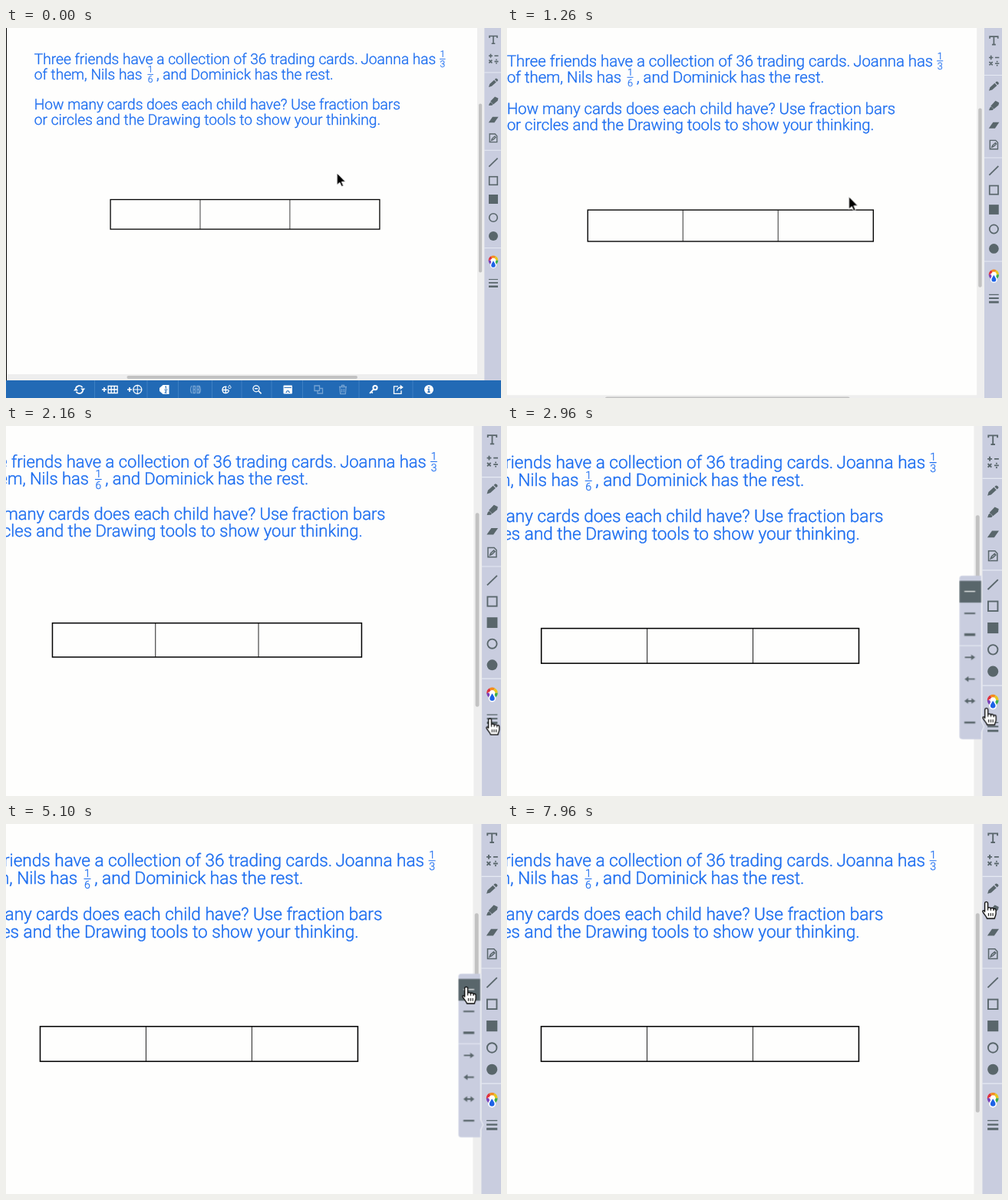
An HTML page for the animation above (8000 ms loop, 645 by 482 pixels).

```html
<!DOCTYPE html>
<html lang="en">
<head>
<meta charset="utf-8">
<title>Fraction bars</title>
<style>
html, body { margin: 0; width: 100%; height: 100%; overflow: hidden; background: #fefefd; }
svg { display: block; width: 645px; height: 482px; }
text { font-family: Roboto, sans-serif; text-rendering: geometricPrecision; }

#scene, #cursor, .step { animation: 8s infinite; }
#scene { transform-origin: 645px 0; animation-name: zoom; }
#cursor { animation-name: move; animation-timing-function: cubic-bezier(.37, 0, .63, 1); }
.step { animation-timing-function: step-end; }
#popup { animation-name: popup; }
#second { animation-name: second; }
#arrow { animation-name: arrow; }
#hand { animation-name: hand; }

/* quadratic ease in, then out */
@keyframes zoom {
  0%, .0625% { transform: scale(1); animation-timing-function: cubic-bezier(.3333, 0, .6667, .3333); }
  19.1875% { transform: scale(1.09); animation-timing-function: cubic-bezier(.3333, .6667, .6667, 1); }
  38.3125%, 100% { transform: scale(1.18); }
}
@keyframes move {
  0%, 12.65% { transform: translate(431.3px, 189px); }
  26%, 34.125% { transform: translate(632.8px, 331.6px); }
  45%, 52.125% { transform: translate(604px, 208px); }
  58.75%, 77.125% { transform: translate(606.9px, 179.7px); }
  81.25%, 95% { transform: translate(557px, 185px); }
  99.5%, 100% { transform: translate(628px, 85.8px); }
}
@keyframes popup { 0%, 83.75%, 100% { opacity: 0; } 31.25% { opacity: 1; } }
@keyframes second { 0%, 63.25%, 100% { opacity: 0; } 50.375% { opacity: 1; } }
@keyframes arrow { 0%, 78.28% { opacity: 1; } 24%, 98.65%, 100% { opacity: 0; } }
@keyframes hand { 0%, 78.28% { opacity: 0; } 24%, 98.65%, 100% { opacity: 1; } }

#problem { fill: #1a6cf0; stroke: #1a6cf0; stroke-width: .35; font-size: 19px; font-weight: 300; }
.small { font-size: 12px; text-anchor: middle; stroke-width: .2; }
.line { fill: none; stroke: currentColor; }
.solid { fill: currentColor; }
#side, #popup { color: #59666b; stroke-width: 1.6; }
#bottom { color: #fff; stroke-width: 1.3; }
.dim { color: #75a3d3; }
.sep { fill: none; stroke: #e6eaf4; stroke-width: 1; }
</style>
</head>
<body>
<svg viewBox="0 0 645 482">
<g id="scene">
  <rect width="645" height="482" fill="#fefefd"/>
  <path d="M.5 0V459" stroke="#000"/>

  <g id="problem">
    <text x="36.8" y="46.7">Three friends have a collection of 36 trading cards.</text>
    <text x="560.3" y="46.7" text-anchor="end">Joanna has</text>
    <text x="36.8" y="66.5">of them, Nils has</text>
    <text x="196" y="66.5">, and Dominick has the rest.</text>
    <text x="36.8" y="106">How many cards does each child have? Use fraction bars</text>
    <text id="last" x="36.8" y="125.8">or circles and the Drawing tools to show your thinking.</text>
    <text class="small" x="568.8" y="38.2">1</text>
    <text class="small" x="568.8" y="51.2">3</text>
    <text class="small" x="188.2" y="58.2">1</text>
    <text class="small" x="188.2" y="71.2">6</text>
    <path d="M565 40.4h7.6M184.4 60.6h7.6" stroke-width=".9"/>
  </g>

  <rect x="136.1" y="223.5" width="350.8" height="38.6" fill="none" stroke="#000" stroke-width="1.3"/>
  <path d="M253 223.5v38.6M369.9 223.5v38.6" stroke="#111" stroke-width=".8"/>

  <!-- scroll bars -->
  <path d="M614 0h9.5v459H1v-8h613z" fill="#eee"/>
  <rect x="616" y="98.5" width="4.2" height="220" rx="2" fill="#c2c2c2"/>
  <rect x="157.5" y="453" width="300.5" height="4" rx="2" fill="#c2c2c2"/>

  <g id="side">
    <rect x="623.3" width="21.7" height="459" fill="#c9cddf"/>
    <path class="sep" d="M623.3 58H645M623.3 159.3H645M623.3 286.6H645"/>
    <path class="line" d="M630 13V10.5h10V13M635 10.5v10M632.7 20.3h4.6"/>
    <path class="line" d="M629 36.3h5M631.5 33.8v5M636.5 36.3h5M629.4 41.6l4 4M633.4 41.6l-4 4M636.5 43.6h5"/>
    <circle class="solid" cx="639" cy="41.3" r=".9"/>
    <circle class="solid" cx="639" cy="45.9" r=".9"/>
    <path class="solid" d="M629 77l1.2-4 5.8-5.3 2.8 2.9-5.8 5.2zM636.8 67l1.7-1.4q2.6.5 2.7 2.7l-1.6 1.6z"/>
    <path class="solid" d="M629 101l1-3 1.6-1.5 3 3-1.2 1.3zM631.2 95.6l5.8-6.2 4.4 2.2-.7 3.2-5.6 4.6z"/>
    <path class="solid" d="M628.8 123.2l5.2-7.4h7.6l-5.2 7.4z"/>
    <path class="line" stroke-width="1.3" d="M630.2 138h7l2.6 2.7v8h-9.6zM632.5 146.5l1-2.4 3.4-3 1.2 1.3-3.3 3z"/>
    <path class="line" d="M629.3 180.6L640.6 169.6"/>
    <rect class="line" x="629.7" y="193.7" width="10.6" height="10.6"/>
    <rect class="solid" x="629" y="217" width="12" height="12"/>
    <circle class="line" cx="635" cy="247" r="5.3"/>
    <circle class="solid" cx="635" cy="271" r="6"/>
    <circle cx="635" cy="302.8" r="4.5" fill="#fff"/>
    <g id="wheel" fill="none" stroke-width="2.9"></g>
    <path d="M635 302c1.6 2.900 3.500 4.700 3.500 6.900a3.500 3.500 0 0 1-7 0c0-2.200 1.900-4 3.500-6.900z" fill="#1d62e6" stroke="#fff" stroke-width="1.4"/>
    <path class="solid" d="M629 327h12v1h-12zM629 331h12v1.800h-12zM629 335.400h12v2.500h-12z"/>
  </g>

  <g id="bottom">
    <rect y="459" width="645" height="23" fill="#226ab5"/>
    <path d="M115.5 459v23M184 459v23M224.5 459v23M268.5 459v23M307 459v23M346 459v23M386.5 459v23M460 459v23M530 459v23" stroke="#3c7fc3" stroke-width="1"/>
    <path class="line" stroke-width="1.7" d="M90.9 469.5a4.8 4.8 0 0 1 8.7-1.2M100.2 472.5a4.8 4.8 0 0 1-8.7 1.3"/>
    <path class="solid" d="M97.2 469.6h6l-3 3.6zM88 472.4h6l-3-3.6z"/>
    <path class="line" stroke-width="1.6" d="M125 471h6M128 468v6M158 471h6M161 468v6"/>
    <path class="line" d="M133.2 466.5h12v9h-12zM137.2 466.5v9M141.2 466.5v9M133.2 471h12"/>
    <circle class="line" cx="171.3" cy="471" r="5.5"/>
    <path class="line" d="M171.3 465.5v11M165.8 471h11" stroke-width="1"/>
    <path class="solid" d="M204.5 465h8v12h-8l-4.500-4v-4z"/>
    <path d="M207.2 467.4l1.2-.7v3M206.5 471h4M206.9 472.8h2.4l-2.4 2.5h2.8" fill="none" stroke="#226ab5" stroke-width="1"/>
    <g class="dim">
      <path class="line" d="M242 466q-3 5 0 10M252 466q3 5 0 10M244 466.5h2.5v9H244zM249 466.5h2.5v9H249zM244 471h2.5M249 471h2.5"/>
      <path class="line" d="M402 466h6.5v6.5H402zM406 472.5v3.5h6.5v-6.5h-4"/>
      <path class="line" d="M434 467.5h10M437.5 467v-1.6h3v1.6M435 468l.7 8.6h6.6l.7-8.6M437.6 470v4.8M440.4 470v4.8"/>
    </g>
    <path class="line" d="M287.5 467.3a4.3 4.3 0 1 0 3 4.4M282 471.5h8M286.3 467v9"/>
    <path class="line" d="M291.4 465.2c2.4 3 2 4.4 0 4.4s-2.4-1.4 0-4.4z" stroke-width="1"/>
    <circle class="line" cx="326" cy="469.8" r="4"/>
    <path class="line" d="M324 469.8h4M329 472.8l3.6 3.6" stroke-width="1.6"/>
    <rect class="solid" x="361.5" y="465.5" width="11.5" height="11" rx="1"/>
    <path d="M362.5 468.4h9.5M364.5 474.5h1.4v-1.7h2.7v1.7h1.4" fill="none" stroke="#226ab5" stroke-width="1"/>
    <circle class="line" cx="481" cy="468.6" r="2.6" stroke-width="2"/>
    <path class="line" stroke-width="1.8" d="M479 470.6l-5 5.2M476 473.8l1.8 1.8"/>
    <path class="line" d="M511 466.8h-5.5v9.5h9.5v-4M509.5 472.8q.5-4.5 5-4.8"/>
    <path class="solid" d="M513.6 464.8l4.2 3.2-4.2 3.2z"/>
    <circle class="solid" cx="551" cy="471" r="6"/>
    <path d="M551 467v1.8M549.5 470.5h1.5v3.6M549.3 474.2h3.4" fill="none" stroke="#226ab5" stroke-width="1.4"/>
  </g>

  <g id="popup" class="step">
    <path d="M622.5 165.3v161l2.8 5.7-2.8 5.7v8.1H601a3 3 0 0 1-3-3V168.3a3 3 0 0 1 3-3z" fill="#c9cddf"/>
    <path d="M622.4 165.3v161l2.8 5.7-2.8 5.7v8.1" fill="none" stroke="#eceff6" stroke-width=".9"/>
    <path class="sep" d="M598 242.6h24.4"/>
    <rect class="solid" x="598" y="171" width="24" height="24"/>
    <path d="M603.4 182.7h12" stroke="#fff" stroke-width="1"/>
    <path class="solid" d="M603.4 206h12v1.7h-12zM603.4 229h12v2.9h-12zM603.4 326.5h12v2h-12z"/>
    <path class="line" d="M604 255.5h8M607 279.5h8M606 303.7h7"/>
    <path class="solid" d="M611 252.4l4.3 3.1-4.3 3.1zM608 276.4l-4.3 3.1 4.3 3.1zM611.3 300.6l4.2 3.1-4.2 3.1zM607.6 300.6l-4.2 3.1 4.2 3.1z"/>
    <g id="second" class="step">
      <rect x="598" y="170.5" width="24" height="25" fill="#c9cddf"/>
      <path class="solid" d="M603.4 182.2h12v1h-12zM598 195h24v24h-24z"/>
      <path d="M603.4 206.9h12" stroke="#fff" stroke-width="1.7"/>
    </g>
  </g>

  <g id="cursor">
    <path id="arrow" class="step" d="M0 0V15.5L3.6 12.2 6 17.6 8.4 16.5 6.1 11.3H11z" fill="#000" stroke="#fff" stroke-width=".9"/>
    <g id="hand" class="step" stroke="#000" stroke-width="1.1" stroke-linejoin="round">
      <path d="M-2 11V1.8a1.7 1.7 0 0 1 3.4 0V7.2c.4-1.3 3-1.2 3.2.4.6-1.2 3-.9 3.1.7.7-1 2.6-.6 2.6 1V13c0 2-1.2 3-1.5 5.5H.5c-.4-2-3.2-4.6-4.6-7.2-.8-1.6.9-2.6 2.1-.3z" fill="#fff"/>
      <path d="M1.4 7v2.6M4.6 7.500v2.200M7.700 8.200v1.800M2.100 12.500v3.300M4.500 12.500v3.300M6.900 12.500v3.300" stroke-width=".9"/>
    </g>
  </g>
</g>
</svg>
<script>
// colour wheel: six equal arcs, clockwise from the left
const hues = ['#e0303c', '#f58a1f', '#e8c81f', '#3fae49', '#2a6fdb', '#7a3fb8'];
document.getElementById('wheel').innerHTML = hues.map((c, i) =>
  `<circle cx="635" cy="302.8" r="4.8" pathLength="6" stroke="${c}" stroke-dasharray="1 5" stroke-dashoffset="${-(i + 3) % 6}"/>`
).join('');

// size the type so the last line fills its column
const pen = document.createElement('canvas').getContext('2d');
pen.font = '300 100px Roboto, sans-serif';
const full = pen.measureText(document.getElementById('last').textContent).width;
document.getElementById('problem').style.fontSize = 451.5 / full * 100 + 'px';
</script>
</body>
</html>
```
